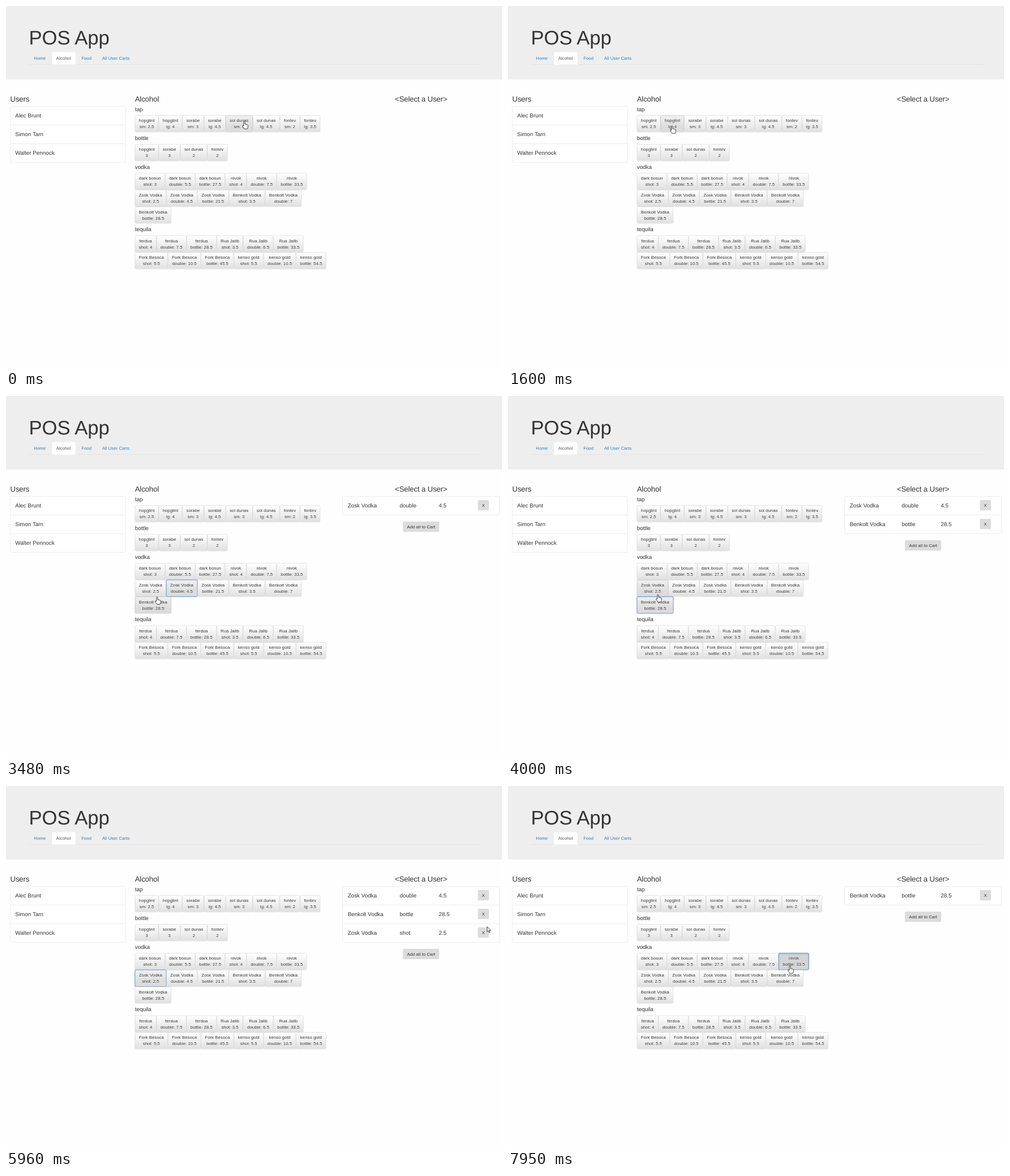
An HTML page that plays this animation: 876 by 640 pixels, repeating every 8000 ms.

```html
<!DOCTYPE html>
<html lang="en">
<head>
<meta charset="utf-8">
<title>POS App</title>
<style>
  * { box-sizing: border-box; }
  html, body { margin: 0; width: 100%; height: 100%; overflow: hidden; background: #fefefe; }
  #stage { position: relative; width: 876px; height: 640px; overflow: hidden; }
  /* A wide page, shown scaled down */
  #page {
    position: absolute; width: 1604px; transform-origin: 0 0; transform: translate(-.7px, 0) scale(.549);
    font: 14px/20px "Liberation Sans", Arial, sans-serif; letter-spacing: .01em; color: #333;
    text-rendering: geometricPrecision; white-space: nowrap;
  }
  h1, h3, h4 { font-weight: 400; letter-spacing: 0; }
  h1 { margin: 20px 0 10px; font-size: 63px; line-height: 69px; }
  h3 { margin: 20px 0 10px; font-size: 24px; line-height: 26px; letter-spacing: -.01em; }
  h4 { margin: 10px 0; font-size: 18px; line-height: 19px; }
  header { display: flow-root; height: 237px; margin-bottom: 30px; padding: 48px 75px; background: #eee; border-radius: 6px; }
  nav { display: flex; height: 42px; border-bottom: 1px solid #ddd; }
  nav span { height: 42px; margin-right: 2px; padding: 10px 15px; border: 1px solid transparent; border-radius: 4px 4px 0 0; color: #337ab7; }
  nav .current { color: #555; background: #fefefe; border-color: #ddd #ddd #fefefe; }
  main { display: grid; grid-template-columns: 3fr 5fr 4fr; }
  section { min-width: 0; padding: 0 15px; }
  #order { text-align: center; }
  .list { border: 1px solid #ddd; border-radius: 4px; background: #fff; font-size: 18px; letter-spacing: 0; text-align: left; }
  .list div { height: 60px; padding-left: 15px; line-height: 59px; border-bottom: 1px solid #ddd; }
  .list div:last-child { height: 59px; border: 0; }
  #cart .list div { display: grid; grid-template-columns: 4fr 3fr 3fr 2fr; padding: 0; }
  #cart .list span { padding-left: 15px; }
  .shelf { display: flex; flex-wrap: wrap; }
  button {
    height: 54px; margin: 0; padding: 6px 12px; border: 1px solid #ccc; border-radius: 4px;
    font: inherit; letter-spacing: inherit; color: #333; text-shadow: 0 1px 0 #fff;
    background: linear-gradient(#fff, #e0e0e0); box-shadow: 0 1px 1px rgba(0, 0, 0, .075);
  }
  button.hover, .shelf button.focus { border-color: #adadad; background: linear-gradient(#f0f0f0, #dcdcdc 72%); }
  button.focus { outline: 2px solid #7fa5d8; outline-offset: -1px; }
  .shelf button.active { border-color: #8c8c8c; background: #d4d4d4; box-shadow: inset 0 3px 5px rgba(0, 0, 0, .125); }
  #cart button { height: 34px; border-color: transparent; background: #dcdcdc; background-clip: border-box; box-shadow: none; text-shadow: none; }
  #cart .list button { justify-self: start; margin: 11px 0 0 15px; font-size: 14px; line-height: 20px; }
  #cart .add { margin-top: 20px; }
  #cursor { position: absolute; left: 0; top: 0; overflow: visible; fill: #fff; stroke: #222; stroke-width: .85; stroke-linejoin: round; }
</style>
</head>
<body>
<div id="stage">
  <div id="page">
    <header>
      <h1>POS App</h1>
      <nav><span>Home</span><span class="current">Alcohol</span><span>Food</span><span>All User Carts</span></nav>
    </header>
    <main>
      <section>
        <h3>Users</h3>
        <div class="list"><div>Alec Brunt</div><div>Simon Tarn</div><div>Walter Pennock</div></div>
      </section>
      <section><h3>Alcohol</h3><div id="menu"></div></section>
      <section id="order"><h3>&lt;Select a User&gt;</h3><div id="cart"></div></section>
    </main>
  </div>
  <svg id="cursor" width="1" height="1">
    <path id="hand" d="M-1.2 8V1.1A1.1 1.1 0 0 1 1 1.1V5Q3 4.3 3 5.6Q5 5 5 6.3Q6.3 5.9 6.3 7.3V9.5Q6.2 11 5 13.2H-.2Q-1.3 11.5 -3 9.3Q-4 7.8 -3 7.2Q-2 6.9 -1.2 8Z"/>
    <path id="arrow" d="M0 0V9.2L2.1 7.2L3.6 10.6L5 10L3.6 6.8H6.5Z"/>
  </svg>
</div>
<script>
const $ = id => document.getElementById(id);

const menu = {
  tap: {
    'hopglint': ['sm: 2.5', 'lg: 4'], 'sorabe': ['sm: 3', 'lg: 4.5'],
    'sol dunas': ['sm: 3', 'lg: 4.5'], 'fontev': ['sm: 2', 'lg: 3.5']
  },
  bottle: { 'hopglint': ['3'], 'sorabe': ['3'], 'sol dunas': ['2'], 'fontev': ['2'] },
  vodka: {
    'dark bosun': ['shot: 3', 'double: 5.5', 'bottle: 27.5'],
    'nivok': ['shot: 4', 'double: 7.5', 'bottle: 33.5'],
    'Zosk Vodka': ['shot: 2.5', 'double: 4.5', 'bottle: 21.5'],
    'Benkolt Vodka': ['shot: 3.5', 'double: 7', 'bottle: 28.5']
  },
  tequila: {
    'ferdua': ['shot: 4', 'double: 7.5', 'bottle: 28.5'],
    'Rua Jalib': ['shot: 3.5', 'double: 6.5', 'bottle: 33.5'],
    'Fork Besoca': ['shot: 5.5', 'double: 10.5', 'bottle: 45.5'],
    'kenso gold': ['shot: 5.5', 'double: 10.5', 'bottle: 54.5']
  }
};

// Pointer moves: start, end, then where its tip arrives
const origin = [421, 204];
const moves = [
  [40, 520, 375, 218], [920, 1040, 336, 213], [1400, 1600, 290, 212],
  [1980, 2390, 289, 329], [2850, 2890, 287.5, 327], [3280, 3560, 262, 362],
  [3780, 4000, 265, 351], [4320, 4680, 424, 351], [4680, 4960, 712, 335],
  [4960, 5750, 855, 241], [5860, 6040, 846, 254], [6530, 6730, 845, 202],
  [7150, 7830, 498, 318]
];
// Mouse down and up; each acts on whatever lies under the pointer
const clicks = [[3040, 3280], [3600, 3720], [4160, 4240], [6180, 6260], [7030, 7110], [7950, 8000]];

$('menu').innerHTML = Object.entries(menu).map(([kind, drinks]) =>
  `<h4>${kind}</h4><div class="shelf">` + Object.entries(drinks).map(([name, sizes]) =>
    sizes.map(size => `<button>${name}<br>${size}</button>`).join('')).join('') + '</div>').join('');

const items = [...document.querySelectorAll('.shelf button')].map(el => {
  const [name, size] = el.innerHTML.split('<br>');
  return { el, name, size, rect: el.getBoundingClientRect() };
});

const smooth = u => u * u * (3 - 2 * u);

function pointer(t) {
  let [x, y] = origin;
  for (const [start, end, toX, toY] of moves) {
    if (t <= start) break;
    const e = smooth(Math.min(1, (t - start) / (end - start)));
    x += (toX - x) * e;
    y += (toY - y) * e;
  }
  return [x, y];
}

function hitTest([x, y], rowCount) {
  const item = items.find(({ rect: r }) => x >= r.left && x < r.right && y >= r.top && y < r.bottom);
  if (item) return { item };
  const top = 177.3, pitch = 33;
  const row = Math.floor((y - top) / pitch), dy = y - top - row * pitch;
  const onRemove = x >= 833 && x < 852.3 && dy > 6.5 && dy < 25.4;
  return onRemove && row >= 0 && row < rowCount ? { row } : null;
}

function stateAt(t) {
  const cart = [];
  let focus = null, pressed = false;
  for (const [down, up] of clicks) {
    if (t < down) break;
    focus = hitTest(pointer(down), cart.length) || {};
    pressed = t < up;
    if (pressed) break;
    if (focus.item) cart.push(focus.item);
    else if (focus.row >= 0) cart.splice(focus.row, 1);
  }
  return { cart, focus: focus || {}, pressed };
}

function cartHtml(cart, focusRow) {
  if (!cart.length) return '';
  const rows = cart.map(({ name, size }, i) => {
    const [measure, price] = size.split(': ');
    return `<div><span>${name}</span><span>${measure}</span><span>${price}</span>` +
      `<button class="${i === focusRow ? 'focus' : ''}">X</button></div>`;
  });
  return `<div class="list">${rows.join('')}</div><button class="add">Add all to Cart</button>`;
}

let shownCart = '';
function draw(t) {
  const { cart, focus, pressed } = stateAt(t);
  const tip = pointer(t), over = hitTest(tip, cart.length);

  const html = cartHtml(cart, focus.row);
  if (html !== shownCart) $('cart').innerHTML = shownCart = html;

  for (const item of items) {
    const focused = item === focus.item;
    item.el.classList.toggle('hover', over?.item === item);
    item.el.classList.toggle('focus', focused);
    item.el.classList.toggle('active', focused && pressed);
  }
  $('hand').style.display = over ? '' : 'none';
  $('arrow').style.display = over ? 'none' : '';
  $('cursor').style.transform = `translate(${tip[0]}px, ${tip[1]}px)`;
}

const start = performance.now();
function tick() {
  draw((performance.now() - start) % 8000);
  requestAnimationFrame(tick);
}
tick();
</script>
</body>
</html>
```
